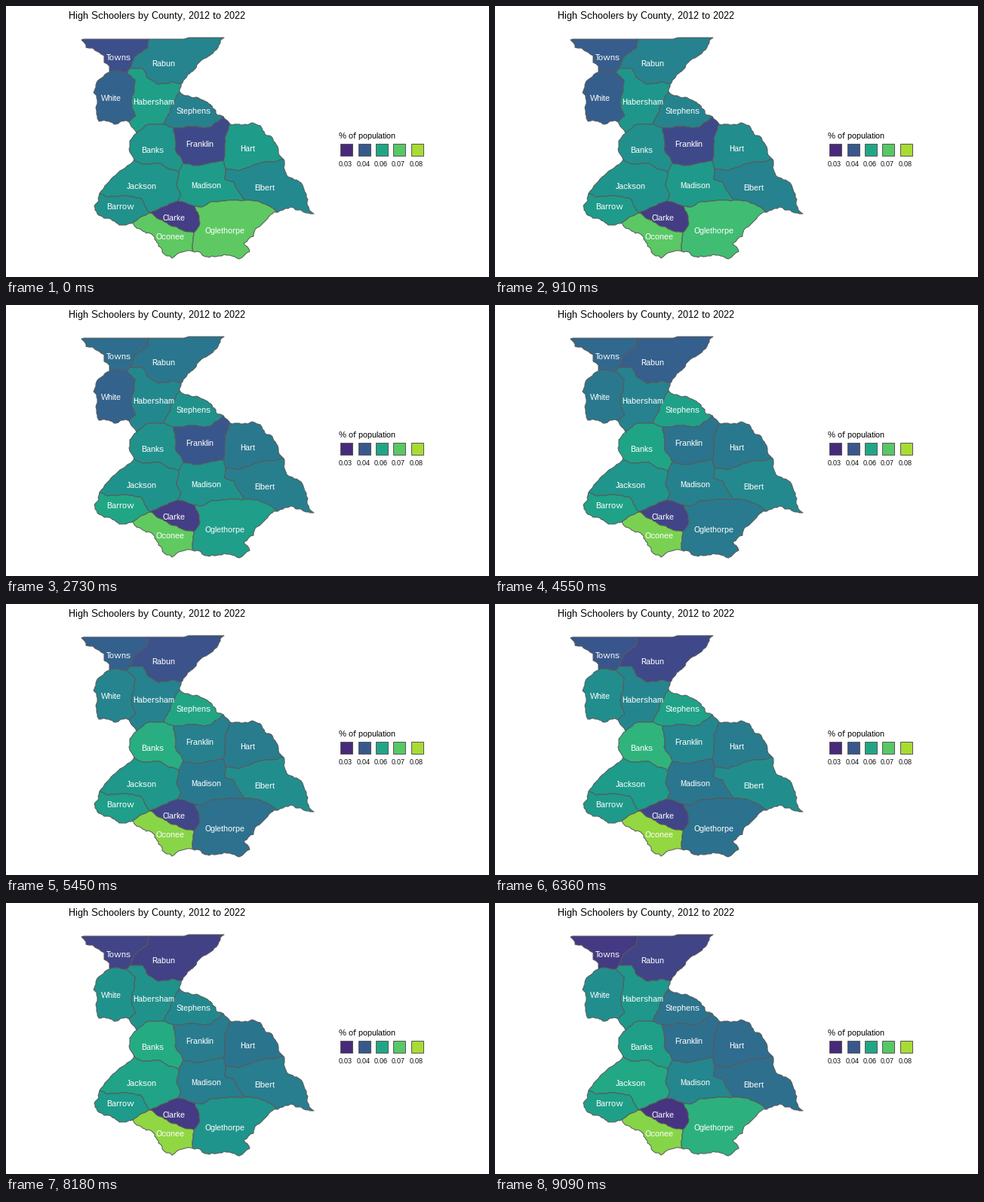
A matplotlib script that plays this animation: 640x360 px, repeating every 10000 ms.

```python
import numpy as np
import matplotlib as mpl
import matplotlib.pyplot as plt
from matplotlib.animation import FuncAnimation
from matplotlib.patches import Polygon, Rectangle

W, H, DPI = 640, 360, 100
LOOP, STEP, YEARS = 10000, 20, 11
EDGE = "#595959"
COAST, INNER = 0.16, 0.07

mpl.rcParams["font.family"] = "Liberation Sans"
mpl.rcParams["text.hinting"] = "native"
mpl.rcParams["text.hinting_factor"] = 1

rng = np.random.default_rng(12)
fig = plt.figure(figsize=(W / DPI, H / DPI), dpi=DPI, facecolor="white")
ax = fig.add_axes([0, 0, 1, 1])
ax.set(xlim=(0, W), ylim=(H, 0))
ax.axis("off")

shade = mpl.colormaps["viridis"]

# Points where borders meet
NODES = dict(
    a=(137, 88), b=(189, 44), c=(164, 83), d=(160, 88), e=(232, 104), f=(230, 114),
    g=(163, 154), h=(173, 169), i=(209, 157), j=(222, 162), k=(288, 147), l=(297, 157),
    m=(288, 206), n=(235, 209), o=(291, 216), p=(368, 204), q=(229, 221), r=(170, 204),
    s=(124, 249), t=(228, 259), u=(250, 266), v=(316, 258), w=(360, 274), x=(249, 301),
    y=(191, 275), z=(168, 288), A=(248, 326), B=(100, 45), C=(289, 42))
borders = {}


def px(size):
    return size * 72 / DPI


def label(x, y, text, size, color="black", ha="center"):
    ax.text(x, y, text, fontsize=px(size), color=color, ha=ha, va="baseline", zorder=5)


def wiggle(a, b, amount):
    """Split a segment by seeded midpoint displacement; b is left out."""
    d = b - a
    if np.hypot(*d) < 5:
        return [a]
    side = np.array([-d[1], d[0]])
    mid = np.round((a + b) / 2 + side * rng.uniform(-amount, amount))
    return wiggle(a, mid, amount) + wiggle(mid, b, amount)


def border(ends, *via, rough=INNER):
    pts = [np.array(p, float) for p in (NODES[ends[0]], *via, NODES[ends[1]])]
    line = [q for a, b in zip(pts, pts[1:]) for q in wiggle(a, b, rough)] + [pts[-1]]
    borders[ends], borders[ends[::-1]] = line, line[::-1]


def outline(loop):
    pts = []
    for a, b in zip(loop, loop[1:] + loop[0]):
        if a + b not in borders:
            border(a + b)
        pts += borders[a + b][:-1]
    return pts


def trend(start, end, arch, wave):
    """Colour position per year: a straight trend plus two slow swings."""
    u = np.linspace(0, 1, YEARS)
    return start + (end - start) * u + arch * np.sin(np.pi * u) + wave * np.sin(2 * np.pi * u)


# Outer edge
border("Bb", rough=0)
border("bC", rough=0)
border("aB", (137, 80), (130, 75), (130, 66), (122, 61), (106, 55), rough=COAST)
border("Ce", (282, 52), (262, 70), (252, 82), (239, 95), rough=COAST)
border("ag", (126, 96), (116, 115), (119, 135), (123, 153), rough=COAST)
border("fk", (245, 121), (258, 124), (274, 136), rough=COAST)
border("lp", (320, 158), (337, 159), (343, 170), (358, 184), (362, 198), rough=COAST)
border("pw", (368, 214), (382, 231), (398, 250), (408, 276), (388, 271), rough=COAST)
border("wA", (345, 284), (332, 295), (328, 306), (315, 315), (323, 326), (309, 336),
       (282, 332), rough=COAST)
border("Az", (220, 335), (207, 327), (197, 310), (181, 299), rough=COAST)
border("zs", (150, 291), (130, 282), (117, 266), rough=COAST)
border("rh", (163, 190), (164, 179))

# Shared borders that bend
border("bc", (188, 55), (170, 68))
border("ce", (181, 83), (188, 96), (201, 104), (222, 101))
border("dg", (171, 98), (166, 128), (172, 146))
border("fi", (218, 136))
border("hi", (184, 159))
border("jk", (271, 161))
border("jn", (224, 190))
border("lm", (290, 175))
border("mn", (257, 212))
border("op", (309, 219), (335, 209))
border("ov", (290, 230), (301, 233))
border("vw", (332, 259))
border("rq", (178, 209), (204, 209))
border("qt", (226, 237), (232, 250))
border("sy", (135, 254), (178, 255))
border("yt", (205, 268))
border("uv", (260, 267), (268, 262), (287, 259))
border("yx", (210, 287), (232, 297))
border("ux", (257, 288))

counties = []


def county(name, x, y, loop, *levels):
    shape = Polygon(outline(loop), closed=True, ec=EDGE, lw=px(1), joinstyle="round")
    ax.add_patch(shape)
    label(x, y + 4, name, 11, "white")
    counties.append((shape, shade(trend(*levels))))


county("Towns", 149, 68, "aBbcd", .24, .17, .13, .03)
county("Rabun", 208.5, 76, "bCec", .45, .20, -.025, .04)
county("White", 139, 122, "adg", .31, .49, 0, -.055)
county("Habersham", 196, 127, "dcefihg", .56, .53, -.105, 0)
county("Stephens", 249, 139, "fkji", .43, .38, .165, -.05)
county("Banks", 194, 191, "hijnqr", .52, .56, .045, -.07)
county("Franklin", 256.5, 183, "jklmn", .22, .36, .09, -.07)
county("Hart", 320, 189, "lpom", .55, .35, -.05, -.05)
county("Jackson", 180, 239, "rqtys", .52, .60, -.04, 0)
county("Madison", 265, 238, "nmovutq", .55, .46, -.07, .04)
county("Elbert", 342.5, 241, "opwv", .47, .36, .055, -.055)
county("Barrow", 151.5, 266, "syz", .50, .56, .045, .04)
county("Clarke", 222, 281, "ytux", .18, .15, .035, -.02)
county("Oconee", 218, 306, "yxAz", .75, .82, .015, -.03)
county("Oglethorpe", 290.5, 298, "uvwAx", .75, .64, -.285, .075)

label(83, 17, "High Schoolers by County, 2012 to 2022", 13, ha="left")
label(441, 176, "% of population", 11, ha="left")
for i, (text, t) in enumerate(zip(("0.03", "0.04", "0.06", "0.07", "0.08"),
                                  (.12, .27, .59, .74, .87))):
    x = round(442 + 23.5 * i)
    ax.add_patch(Rectangle((x + .5, 182.5), 16, 16, fc=shade(t), ec=EDGE, lw=px(1)))
    label(x + 8, 213, text, 9)


def draw(step):
    # The year is the one reached by the end of this short step
    year = int((step + 0.75) * STEP * YEARS / LOOP)
    for shape, colors in counties:
        shape.set_facecolor(colors[min(year, YEARS - 1)])
    return [shape for shape, _ in counties]


anim = FuncAnimation(fig, draw, frames=LOOP // STEP, interval=STEP,
                     repeat=True, repeat_delay=0, blit=False)
plt.show()
```
